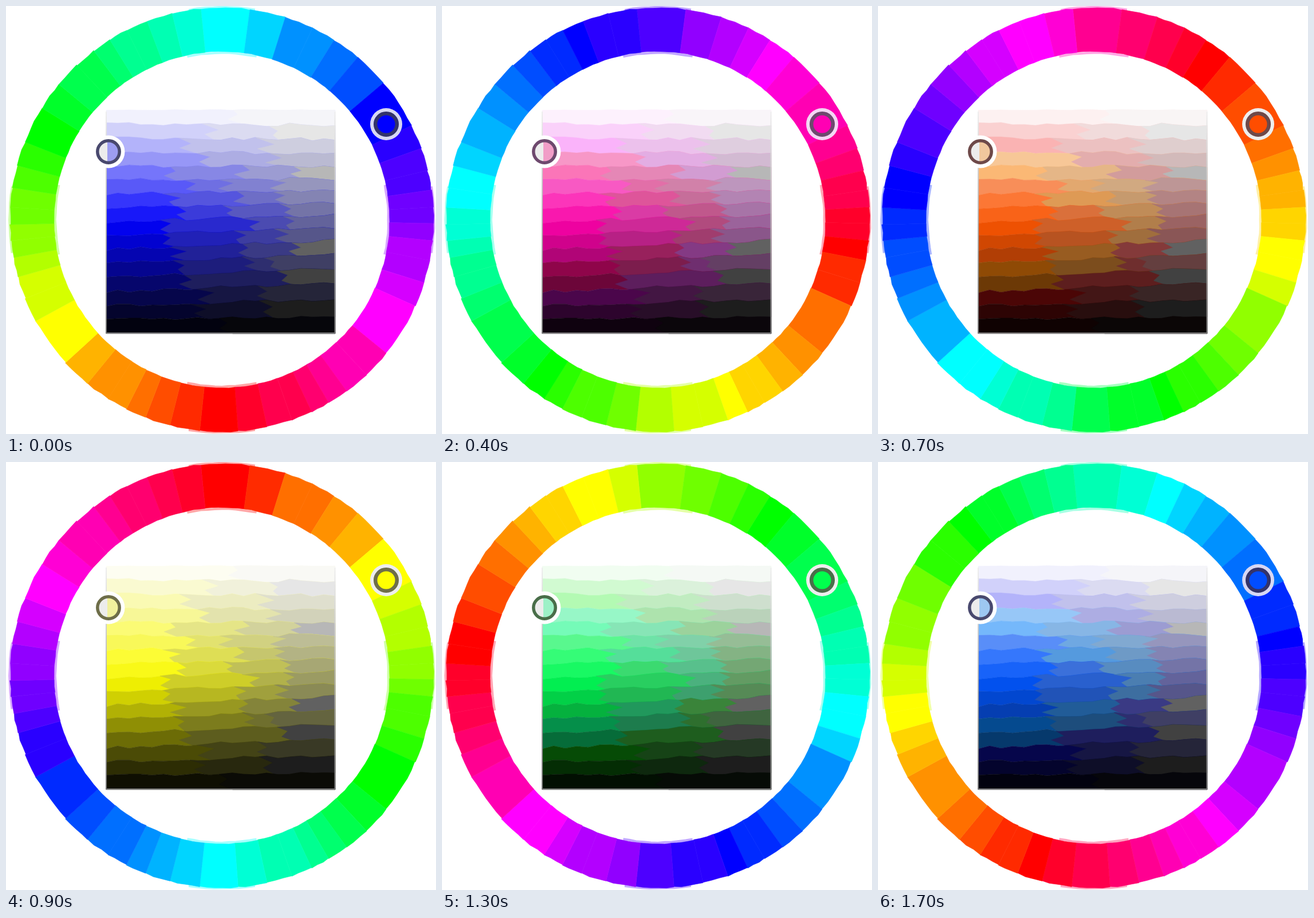
An HTML page for the animation above (1.8 s loop, 751 by 746 pixels).

```html
<!DOCTYPE html>
<html lang="en">
<head>
<meta charset="utf-8">
<title>Colour wheel</title>
<style>
  html, body { margin: 0; width: 100%; height: 100%; overflow: hidden; background: #fff; }
  svg { display: block; width: 751px; height: 746px; }
</style>
</head>
<body>
<svg id="stage" viewBox="0 0 751 746" xmlns="http://www.w3.org/2000/svg">
  <defs>
    <linearGradient id="edge" x1="0" y1="0" x2="0" y2="1">
      <stop offset="0" stop-color="#eee"/>
      <stop offset="1" stop-color="#777"/>
    </linearGradient>
  </defs>
</svg>
<script>
const STEP = 100, COUNT = 18, TURN = 20;
const CX = 377, CY = 372.5, OUTER = 369.5, INNER = 293;
const LEFT = 175, TOP = 181, SIZE = 400, TALL = 390;
const BANDS = 16, SAMPLES = 20;
const stage = document.getElementById('stage');
const painted = []; // [element, attribute, hue => colour]

// Wide ring cells: start, end and how many narrow cells follow
const wide = [
  [-5.7, 7.6, 5], [49.8, 63.6, 9], [114, 129, 7],
  [175.6, 186, 6], [227.6, 241.5, 9], [291.5, 301.8, 8]
];

let seed = 11;
function jitter(size) {
  seed = (seed * 16807) % 2147483647;
  return (seed / 2147483647 * 2 - 1) * size;
}

function add(tag, attrs) {
  const el = document.createElementNS('http://www.w3.org/2000/svg', tag);
  for (const key in attrs) el.setAttribute(key, attrs[key]);
  return stage.appendChild(el);
}

const paint = (el, attr, color) => painted.push([el, attr, color]);
const toPoints = list => list.map(p => p.map(v => v.toFixed(1)).join()).join(' ');
const snap = (value, step) => Math.round(value / step) * step;
const wrap = hue => (hue % 360 + 360) % 360;

function polar(angle, radius) {
  const a = angle * Math.PI / 180;
  return [CX + Math.sin(a) * radius, CY - Math.cos(a) * radius];
}

// Pure hue with its middle channel held to eight levels
function pure(hue) {
  hue = wrap(hue + 1);
  const sector = Math.floor(hue / 60), part = hue / 60 - sector;
  const mid = 255 * (sector % 2 ? 1 - part : part);
  const level = mid < 14.5 ? 0 : mid < 56 ? 42
    : mid > 233 ? 255 : 77 + 34 * Math.min(4, Math.round((mid - 77) / 34));
  return 'rgb(' + [
    [255, level, 0], [level, 255, 0], [0, 255, level],
    [0, level, 255], [level, 0, 255], [255, 0, level]
  ][sector] + ')';
}

// Weak colours keep fewer hues than strong ones
function shade(hue, sat, light) {
  const chroma = (1 - Math.abs(2 * light - 1)) * sat * 255;
  const h = chroma < 75 ? snap(hue, 60) : chroma < 140 ? snap(hue, 30) : hue;
  return `hsl(${h}, ${sat < .2 ? 0 : sat * 100}%, ${light * 100}%)`;
}

function arc(from, to, radius, wobble) {
  const list = [], n = Math.ceil((to - from) / 2.5);
  for (let i = 0; i <= n; i++) {
    list.push(polar(from + (to - from) * i / n, radius + jitter(wobble)));
  }
  return list;
}

function ringCell(from, to) {
  const list = arc(from, to, OUTER, 1).concat(arc(from, to, INNER, .5).reverse());
  const el = add('polygon', { points: toPoints(list), 'stroke-width': .6 });
  const color = hue => pure(hue - 60 + (from + to) / 2);
  paint(el, 'fill', color);
  paint(el, 'stroke', color);
}

function buildRing() {
  // Pale overlap at the four sides
  for (const side of [0, 90, 180, 270]) {
    for (const [radius, reach] of [[OUTER + 1, 9], [INNER - 2, 12]]) {
      const el = add('polyline', {
        points: toPoints(arc(side - reach, side + reach, radius, .5)),
        fill: 'none', 'stroke-width': 4, opacity: .35
      });
      paint(el, 'stroke', hue => pure(hue + side - 60));
    }
  }
  wide.forEach(([start, end, count], k) => {
    const next = k + 1 < wide.length ? wide[k + 1][0] : wide[0][0] + 360;
    const joint = i => {
      const t = i / count;
      return end + (next - end) * (t + .035 * Math.sin(2 * Math.PI * t));
    };
    ringCell(start, end);
    for (let i = 0; i < count; i++) ringCell(joint(i), joint(i + 1));
  });
}

// Border above a band: sags near the top, climbs to the right lower down
function buildEdge(row) {
  const t = row / BANDS, lift = (14 - 50 * t) * Math.sin(Math.PI * t);
  const wobble = row === BANDS ? 0 : row ? 3 : .8;
  const list = [];
  for (let i = 0; i <= SAMPLES; i++) {
    const u = i / SAMPLES;
    list.push([LEFT + SIZE * u, TOP + TALL * t + lift * u + jitter(wobble)]);
  }
  return list;
}

function heightAt(edge, x) {
  const at = Math.max(0, Math.min(SAMPLES - .001, (x - LEFT) / SIZE * SAMPLES));
  const i = Math.floor(at);
  return edge[i][1] + (edge[i + 1][1] - edge[i][1]) * (at - i);
}

function cutLine(x, upper, lower) {
  if (x === LEFT) return [upper[0], lower[0]];
  const list = [];
  for (let i = 0; i < 4; i++) {
    const px = x + (i % 2 ? 11 : -9) + jitter(8), t = i / 3;
    list.push([px, heightAt(upper, px) * (1 - t) + heightAt(lower, px) * t]);
  }
  return list;
}

// Paints from the cut to the right side; the next cell covers the rest
function squareCell(cut, mid, upper, lower, t) {
  const first = cut[0][0], last = cut[cut.length - 1][0];
  const list = [
    ...upper.filter(p => p[0] > first),
    ...lower.filter(p => p[0] > last).reverse(),
    ...cut.reverse()
  ];
  const y = (heightAt(upper, mid) + heightAt(lower, mid)) / 2;
  const light = 1 - (y - TOP) / TALL;
  const sat = Math.min(1, 1 - (mid - LEFT) / SIZE + .12 * Math.sin(Math.PI * t));
  const el = add('polygon', { points: toPoints(list), 'stroke-width': .5 });
  const color = hue => shade(hue, sat, light);
  paint(el, 'fill', color);
  paint(el, 'stroke', color);
}

function buildSquare() {
  const edges = Array.from({ length: BANDS + 1 }, (_, row) => buildEdge(row));
  for (let row = 0; row < BANDS; row++) {
    const t = (row + .5) / BANDS, count = Math.round(1 + 2.3 * Math.sin(Math.PI * t));
    const cuts = [LEFT];
    for (let j = 1; j <= count; j++) {
      cuts.push(LEFT + SIZE * (j / (count + 1)) ** .8 + jitter(28));
    }
    cuts.forEach((x, i) => {
      const end = i < count ? cuts[i + 1] : LEFT + SIZE;
      const upper = edges[row], lower = edges[row + 1];
      squareCell(cutLine(x, upper, lower), (x + end) / 2, upper, lower, t);
    });
  }
  add('path', {
    d: `M${LEFT} 184v386h${SIZE - .5}v-386`, fill: 'none',
    stroke: 'url(#edge)', 'stroke-width': 2
  });
}

function buildMarkers() {
  const weak = hue => wrap(snap(hue, 60));
  const dull = hue => `hsl(${weak(hue)}, 20%, 36%)`;

  const halo = add('circle', { cx: 664, cy: 206, r: 28 });
  paint(halo, 'fill', hue => weak(hue) >= 240 ? `hsl(${weak(hue)}, 58%, 90%)` : '#eee');
  const dot = add('circle', { cx: 664, cy: 206, r: 18.8, 'stroke-width': 6.5 });
  paint(dot, 'fill', pure);
  paint(dot, 'stroke', hue => weak(hue) === 240 ? '#33336b' : dull(hue));

  add('circle', { cx: 179, cy: 254, r: 28.5, fill: '#fff' });
  add('circle', { cx: 179, cy: 254, r: 18, fill: '#ececec' });
  const half = add('path', { d: 'M177 236.5A18 18 0 1 1 177 271.5Z' });
  paint(half, 'fill', hue => shade(hue, .75, .78));
  const rim = add('circle', { cx: 179, cy: 254, r: 19.2, fill: 'none', 'stroke-width': 5.5 });
  paint(rim, 'stroke', dull);
}

let shown = -1;
function draw(ms) {
  const step = Math.floor(ms / STEP) % COUNT;
  if (step === shown) return;
  shown = step;
  const hue = (240 + step * TURN) % 360;
  for (const [el, attr, color] of painted) el.setAttribute(attr, color(hue));
}

buildRing();
buildSquare();
buildMarkers();
const start = performance.now();
function tick() {
  draw(performance.now() - start);
  requestAnimationFrame(tick);
}
tick();
</script>
</body>
</html>
```
